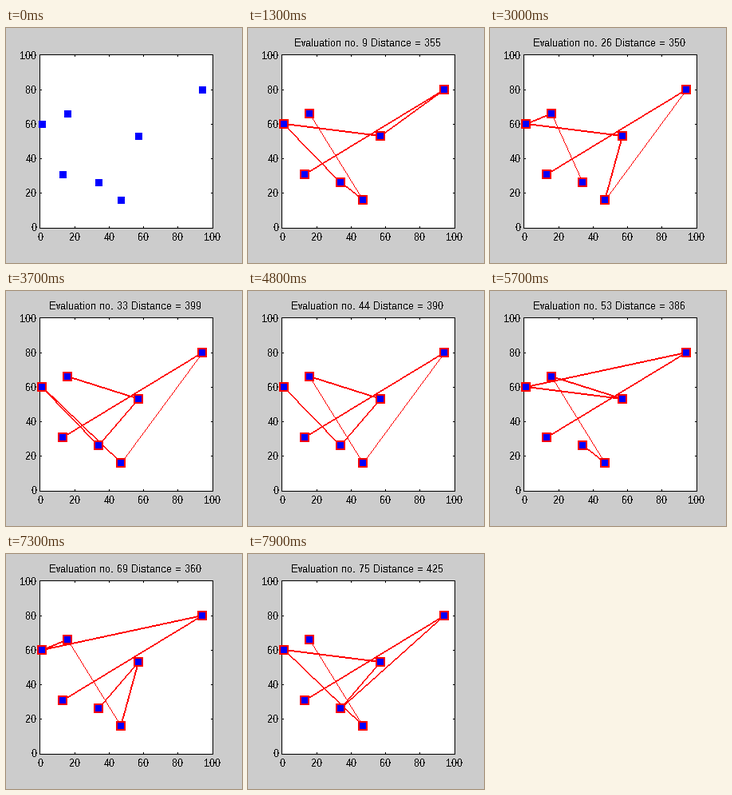
Recreate the animation shown at these times as a matplotlib script. Size 296 px wide and 294 px high, loop 8 s.

```python
import itertools
import math

import matplotlib.pyplot as plt
import numpy as np
from matplotlib.animation import FuncAnimation
from matplotlib.patches import Rectangle

W, H, DPI = 296, 294, 72          # at 72 dpi one point is one pixel
LEFT, RIGHT, TOP, BOTTOM = 42, 259, 33, 250
X0, Y0, SCALE = 42.9, 249.4, 2.156   # data to pixel mapping
FRAMES, STEP = 80, 100
RED, BLUE = "#ff0000", "#0000ff"

# Cities in the order in which the permutations are enumerated
CITIES = [(13, 31), (94, 80), (57, 53), (47, 16), (1, 60), (34, 26), (16, 66)]

plt.rcParams.update({
    "font.family": "Liberation Sans",
    "font.size": 13,
    "text.hinting": "native",
    "text.hinting_factor": 1,
    "text.antialiased": False,
    "toolbar": "None",
})


def to_pixel(x, y):
    return round(X0 + x * SCALE), round(Y0 - y * SCALE)


POINTS = [to_pixel(*c) for c in CITIES]
TOURS = list(itertools.islice(itertools.permutations(range(7)), FRAMES))

fig = plt.figure(figsize=(W / DPI, H / DPI), dpi=DPI, facecolor="#cccccc")
ax = fig.add_axes((0, 0, 1, 1))
ax.axis("off")


def rect(x, y, w, h, color, z=1):
    patch = Rectangle((x, y), w, h, fc=color, ec="none", lw=0,
                      antialiased=False, zorder=z)
    return ax.add_patch(patch)


def draw_axes():
    rect(LEFT, TOP, RIGHT - LEFT + 1, BOTTOM - TOP + 1, "black")
    rect(LEFT + 1, TOP + 1, RIGHT - LEFT - 1, BOTTOM - TOP - 1, "white")
    for value in range(0, 101, 20):
        x, y = to_pixel(value, value)
        if 0 < value < 100:
            for top in (TOP, BOTTOM - 2):
                rect(x, top, 1, 3, "black")
            for left in (LEFT, RIGHT - 2):
                rect(left, y, 3, 1, "black")
        ax.text(x + 0.5, 266, str(value), ha="center", va="baseline")
        ax.text(38.5, y + 5, str(value), ha="right", va="baseline")


def draw_stroke(mask, a, b):
    """Pixel line two pixels thick, or one when moderately steep."""
    dx, dy = abs(b[0] - a[0]), abs(b[1] - a[1])
    n = max(dx, dy) + 1
    xs = np.floor(np.linspace(a[0], b[0], n) + 0.5).astype(int)
    ys = np.floor(np.linspace(a[1], b[1], n) + 0.5).astype(int)
    mask[ys, xs] = True
    if not 1.25 < dy / dx < 3:
        mask[ys - (dx >= dy), xs - (dx < dy)] = True


def draw_tour(tour):
    mask = np.zeros((H, W), bool)
    stops = [POINTS[i] for i in tour]
    for a, b in zip(stops, stops[1:]):
        draw_stroke(mask, a, b)
    pixels = np.zeros((H, W, 4), np.uint8)
    pixels[mask] = (255, 0, 0, 255)
    return pixels


def tour_length(tour):
    stops = [CITIES[i] for i in tour]
    return sum(math.dist(a, b) for a, b in zip(stops, stops[1:] + stops[:1]))


def evaluation(frame):
    """The first four evaluations are held for two frames each."""
    return (frame + 1) // 2 if frame < 9 else frame - 4


draw_axes()
title = ax.text(150, 23, "", ha="center", va="baseline")
lines = ax.imshow(np.zeros((H, W, 4), np.uint8), extent=(0, W, H, 0),
                  interpolation="nearest", aspect="auto", zorder=2)
borders = [rect(x - 6, y - 6, 12, 12, RED, 3) for x, y in POINTS]
fills = [rect(x - 4, y - 4, 9, 9, BLUE, 4) for x, y in POINTS]
ax.set(xlim=(0, W), ylim=(H, 0))


def update(frame):
    number = evaluation(frame)
    running = number > 0
    for border, fill in zip(borders, fills):
        border.set_visible(running)
        size = 8 if running else 9
        fill.set_width(size)
        fill.set_height(size)
    lines.set_visible(running)
    title.set_visible(running)
    if running:
        tour = TOURS[number - 1]
        lines.set_data(draw_tour(tour))
        title.set_text(f"Evaluation no. {number} Distance = {tour_length(tour):.0f}")
    return [title, lines, *borders, *fills]


anim = FuncAnimation(fig, update, frames=FRAMES, interval=STEP,
                     repeat=True, repeat_delay=0)
plt.show()
```
